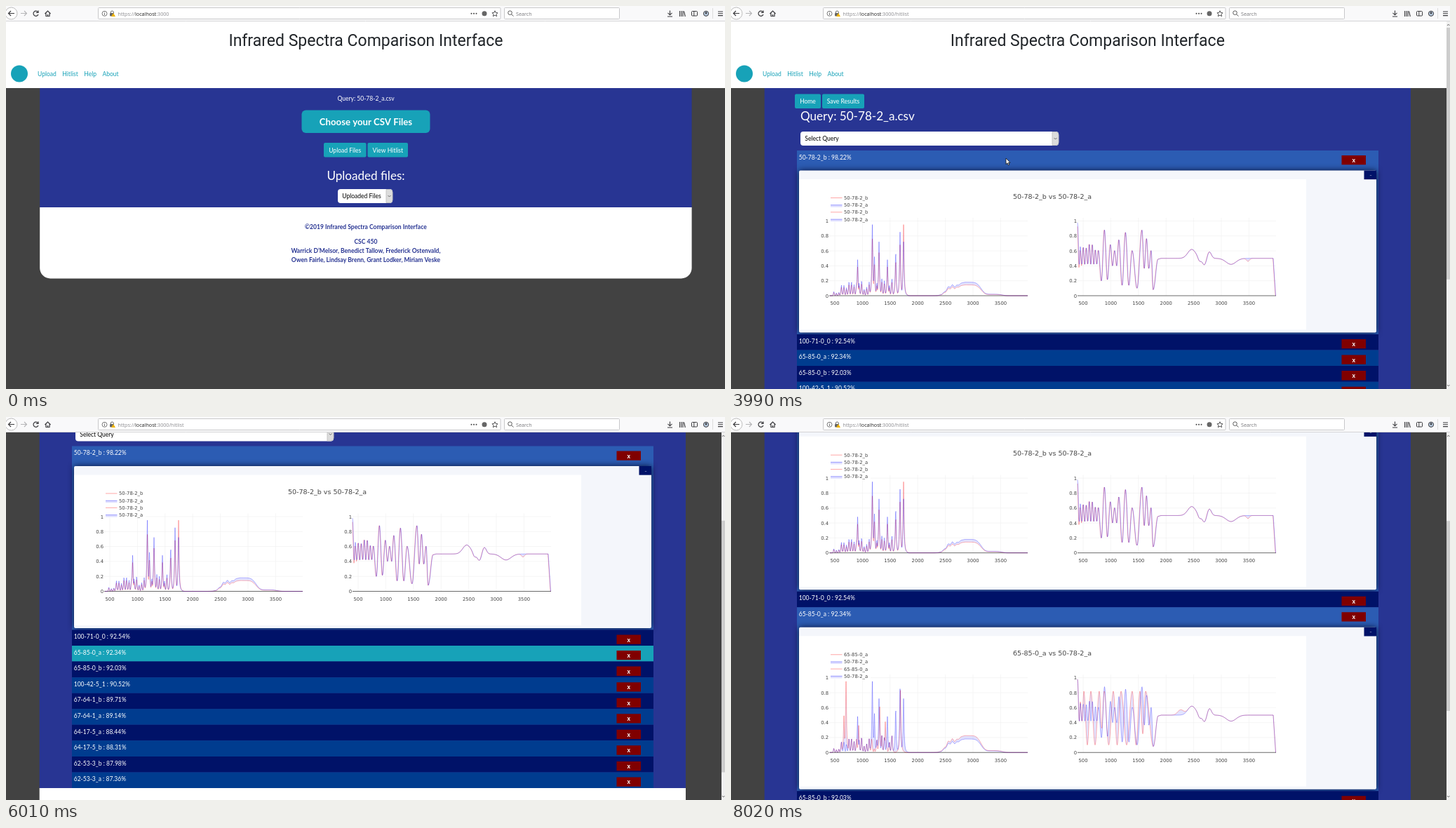
An HTML page with a canvas that plays this animation: 1025x546 px, repeating every 8.56 s.

```html
<!DOCTYPE html>
<html lang="en">
<head>
<meta charset="utf-8">
<title>Infrared Spectra Comparison Interface</title>
<style>
html, body { margin: 0; width: 100%; height: 100%; overflow: hidden; }
canvas { display: block; }
</style>
</head>
<body>
<canvas id="stage" width="1025" height="546"></canvas>
<script>
const ctx = document.getElementById('stage').getContext('2d');
const LOOP = 8560, TEAL = '#17a2b8', INDIGO = '#283593', NAVY = '#001268';
const LIST_TOP = 206, ROW = 22.55, OPEN_ROW = 262;
const CLICK = 1600, HITLIST = 2460, OPEN_FIRST = 3910, OPEN_SECOND = 6170, LEAVE = 8020;
const hits = ['50-78-2_b : 98.22%', '100-71-0_0 : 92.54%', '65-85-0_a : 92.34%', '65-85-0_b : 92.03%',
  '100-42-5_1 : 90.52%', '67-64-1_b : 89.71%', '67-64-1_a : 89.14%', '64-17-5_a : 88.44%',
  '64-17-5_b : 88.31%', '62-53-3_b : 87.98%', '62-53-3_a : 87.36%'];

// Motion: each move is [from, to, ...destination]
const clamp = (v, low, high) => Math.min(high, Math.max(low, v));
const smooth = u => u * u * (3 - 2 * u);
const follow = (start, moves, t) => moves.reduce((at, [from, to, ...goal]) => {
  const u = smooth(clamp((t - from) / (to - from), 0, 1));
  return at.map((v, i) => v + (goal[i] - v) * u);
}, start);
const scrollAt = t => follow([0], [[4565, 5010, 164.5], [6640, 7140, 219.3]], t)[0];
const cursorAt = t => follow([912, 456], [
  [70, 900, 550, 216], [900, 1130, 544, 207], [1680, 2060, 567, 220], [2460, 3300, 392, 217],
  [5360, 5780, 381, 336], [7130, 7400, 406, 318], [7520, 8000, 985, 540]], t);

// Drawing helpers
function box(x, y, w, h, fill, radius = 0, stroke) {
  ctx.beginPath();
  ctx.roundRect(x, y, w, h, radius);
  if (fill) { ctx.fillStyle = fill; ctx.fill(); }
  if (stroke) { ctx.strokeStyle = stroke; ctx.lineWidth = 1; ctx.stroke(); }
}
function line(path, color, width = 1) {
  ctx.strokeStyle = color;
  ctx.lineWidth = width;
  ctx.stroke(typeof path === 'string' ? new Path2D(path) : path);
}
function disc(x, y, r, fill, stroke) { box(x - r, y - r, 2 * r, 2 * r, fill, r, stroke); }
function text(s, x, y, size = 8.54, color = '#fff', align = 'left', font = 'Lato', weight = 400) {
  ctx.font = `${weight} ${size}px "${font}", sans-serif`;
  ctx.fillStyle = color;
  ctx.textAlign = align;
  ctx.fillText(s, x, y);
  return ctx.measureText(s).width;
}
function at(x, y, paint) {
  ctx.save();
  ctx.translate(x, y);
  paint();
  ctx.restore();
}
function button(label, x, y, w, fill = TEAL) {
  box(x, y, w, 20.5, fill, 2);
  text(label, x + w / 2, y + 13.7, 8.54, '#fff', 'center');
}
function select(label, x, y, w) {
  box(x, y, w, 20, '#fff', 4);
  box(x + w - 9, y + .5, 9, 19, '#dcdcdc', [0, 4, 4, 0], '#c4c4c4');
  line(`M${x + w - 6.5} ${y + 9}l2 2l2 -2`, '#555', .8);
  text(label, x + 6.3, y + 13, 8.54, '#000');
}

// Spectra, as functions of the horizontal chart position
let seed = 7;
const random = () => (seed = seed * 16807 % 2147483647) / 2147483647;
const bump = (x, centre, width, power = 2) => Math.exp(-(Math.abs((x - centre) / width) ** power));
const peak = (x, centre, height) => height / (1 + ((x - centre) / .8) ** 2) - .008;

const ripple = Array.from({ length: 25 }, (_, i) =>
  [143 + i * 3.6, Math.min(1, .1 + i / 6) * (.05 + .2 * random())]);
const broadBand = x => bump(x, 314, 10) * (.13 + .015 * Math.sin(x)) + .18 * bump(x, 340, 18, 4) + .02 * bump(x, 372, 16, 4);
const absorbance = (peaks, band) => x =>
  Math.max(0, band * broadBand(x), ...[...ripple, ...peaks].map(([centre, height]) => peak(x, centre, height)));

// Crests joined by cosines; wider gaps give deeper troughs
function oscillation(crests, height) {
  const small = Array.from({ length: 7 }, (_, i) => 498 + i * 4.3).filter(x => x < crests[0] - 4);
  const tops = [...small.map(x => [x, .56 + .14 * random()]), ...crests.map(x => [x, height(x)])];
  const knots = [[494, .98]];
  tops.forEach(([x, y], i) => {
    const before = i ? tops[i - 1][0] : 495, gap = x - before;
    knots.push([before + gap / 2, clamp(.85 - .075 * gap, .1, .42)], [x, y]);
  });
  knots.push([602, .08], [609, .49], [614, .5]);
  return x => {
    const i = knots.findIndex(k => k[0] > x);
    if (i < 1) return baseline(x);
    const [x0, y0] = knots[i - 1], [x1, y1] = knots[i];
    return y0 + (y1 - y0) * (1 - Math.cos(Math.PI * (x - x0) / (x1 - x0))) / 2;
  };
}
const baseline = x => x > 773 ? .5 * (776.5 - x) / 3.5
  : .5 + .12 * bump(x, 657, 8) + .09 * bump(x, 682, 4) - .09 * bump(x, 675, 4) - .05 * bump(x, 668, 3) - .08 * bump(x, 713, 10);

const query = absorbance([[180.5, .49], [201.5, .96], [204.5, .53], [211, .73], [223, .49], [234.8, .6], [241, .86], [246, .73]], 1);
const twin = x => Math.max(.8 * query(x), peak(x, 246, .96));
const other = absorbance([[161, .5], [164, .96], [182, .37], [212, .62], [220, .42], [241.5, .84]], 1.25);
const queryWave = oscillation([532.5, 541, 547, 553, 562.5, 572, 586, 592.5, 599],
  x => .74 + .14 * Math.cos((x - 532.5) / 27 * 2 * Math.PI));
const twinWave = x => queryWave(x + .4) - .04 * bump(x, 737, 3) - .05 * bump(x, 497, 3);
const otherWave0 = oscillation([503, 513, 525, 532, 545, 556, 572, 583, 591], () => .82);
const otherWave = x => otherWave0(x) + .07 * bump(x, 641, 6);

function plot(red, blue, from, to) {
  const sample = f => Array.from({ length: 2 * (to - from) + 1 }, (_, i) =>
    `${from + i / 2} ${(413 - 106.5 * Math.max(0, f(from + i / 2))).toFixed(2)}`);
  const r = sample(red), b = sample(blue), path = p => 'M' + p.join('L');
  return { red: new Path2D(path(r)), blue: new Path2D(path(b)), area: new Path2D(path([...r, ...b.reverse()]) + 'Z') };
}
const comparison = (name, spectrum, waveform) => ({
  name, plots: [plot(spectrum, query, 141, 423), plot(waveform, queryWave, 494, 776.5)]
});
const charts = { 0: comparison('50-78-2_b', twin, twinWave), 2: comparison('65-85-0_a', other, otherWave) };

function drawChart({ name, plots }) {
  const label = (s, x, y, align) => text(s, x, y, 6.8, '#444', align, 'DejaVu Sans');
  text(`${name} vs 50-78-2_a`, 458, 274.5, 9.5, '#444', 'center', 'DejaVu Sans');
  plots.forEach((p, i) => {
    const left = 140 + i * 354;
    for (let k = 0; k < 7; k++) {
      const x = left + 8 + k * 39.4;
      line(`M${x} 302V413`, '#eee', .6);
      label(500 + k * 500, x, 426.3, 'center');
    }
    for (let k = 0; k < 6; k++) {
      const y = 413 - k * 21.3;
      line(`M${left} ${y}H${left + 283}`, k ? '#eee' : '#444', k ? .6 : .8);
      label(k / 5, left - 1, y + 2.5, 'right');
    }
    ctx.fillStyle = 'rgba(0,0,255,.11)';
    ctx.fill(p.area);
    line(p.red, 'rgba(255,0,0,.5)', .6);
    line(p.blue, 'rgba(0,0,255,.5)', .6);
  });
  box(141, 268, 58, 40, '#fff');
  for (let k = 0; k < 4; k++) {
    const y = 273.5 + k * 10.2, blue = k % 2;
    if (blue) box(142, y, 16.5, 3, 'rgba(0,0,255,.13)');
    line(`M142 ${y}h16.5`, blue ? 'rgba(0,0,255,.5)' : 'rgba(255,0,0,.5)', .7);
    label(blue ? '50-78-2_a' : name, 161, y + 2.4);
  }
}

function drawTooltip() {
  const tag = (y, color, value, name) => {
    box(397, y, 44, 11.4, color);
    ctx.fill(new Path2D(`M394 413L397.5 ${y + 3}V${y + 8}Z`));
    text(value, 399, y + 8.2, 6.9, '#fff', 'left', 'Liberation Sans');
    text(name, 443, y + 8.2, 6.9, color, 'left', 'Liberation Sans');
  };
  tag(400.5, '#f00', '0.008571429', '50-78-2_b');
  tag(413, '#00f', '0.005714286', '50-78-2_a');
  box(382, 423.5, 20.5, 11, '#444');
  ctx.fill(new Path2D('M389 424l3 -4l3 4Z'));
  text('3600', 392.2, 431.5, 6.9, '#fff', 'center', 'Liberation Sans');
}

function drawFooter(top, left, width) {
  box(left, top, width, 101.5, '#fff', [0, 0, 15, 15]);
  ['©2019 Infrared Spectra Comparison Interface', 'CSC 450',
    'Warrick D’Melsor, Benedict Tallow, Frederick Ostenvald,',
    'Owen Fairle, Lindsay Brenn, Grant Lodker, Miriam Veske'
  ].forEach((s, i) => text(s, left + width / 2, top + (i ? 39 + 13 * i : 30.5), 8.54, INDIGO, 'center', 'Lato', 700));
}

function drawUpload(t, left, width) {
  box(left, 117, width, 170, INDIGO);
  text('Query: 50-78-2_a.csv', 513, 135.3, 8.54, '#fff', 'center');
  box(421.5, 148.5, 183, 32.5, TEAL, 6);
  text('Choose your CSV Files', 513, 169.8, 13.2, '#fff', 'center', 'Lato', 700);
  button('Upload Files', 453, 195, 60.5);
  if (t >= CLICK) box(513.8, 193.3, 61, 24, 'rgba(23,162,184,.5)', 3);
  button('View Hitlist', 515.5, 195, 57.5, t >= 970 ? '#138496' : TEAL);
  text('Uploaded files:', 513, 248, 17.1, '#fff', 'center');
  select('Uploaded Files', 473, 261, 78);
  drawFooter(287, left, width);
}

function drawPanel(x, w, chart) {
  ctx.save();
  ctx.shadowColor = 'rgba(0,0,30,.85)';
  ctx.shadowBlur = 9;
  box(x, 0, w, 231, '#f4f6fb', 2);
  ctx.restore();
  box(x, 12.5, 723, 214.5, '#fff');
  box(x + w - 17.5, 0, 17.5, 12.7, NAVY);
  text('–', x + w - 8, 8.5, 6, '#fff', 'center');
  if (chart) at(0, -234.5, () => drawChart(chart));
}

function drawHitlist(t, left, width, pointerY) {
  const shift = t >= OPEN_FIRST ? -1 : 0, x = 95 + shift, w = shift ? 829 : 836.5;
  const isOpen = i => (i === 0 && t >= OPEN_FIRST) || (i === 2 && t >= OPEN_SECOND);
  const heights = hits.map((_, i) => isOpen(i) ? OPEN_ROW : ROW);
  const bottom = heights.reduce((sum, h) => sum + h, LIST_TOP);
  box(left, 117, width, bottom - 117, INDIGO);
  button('Home', 92 + shift, 125.5, 37);
  button('Save Results', 131 + shift, 125.5, 60);
  text('Query: 50-78-2_a.csv', 100 + shift, 163, 17.1);
  select('Select Query', 100 + shift, 179, shift ? 368 : 371.5);
  let y = LIST_TOP;
  hits.forEach((hit, i) => {
    const h = heights[i], hover = t < LEAVE && pointerY >= y && pointerY < y + h;
    box(x, y, w, h, isOpen(i) ? '#2c5cb3' : hover ? TEAL : i % 2 ? NAVY : '#003c8f');
    if (isOpen(i)) at(0, y + 28.5, () => drawPanel(x + 3, w - 6, t >= 3990 && charts[i]));
    text(hit, x + 2.7, y + 12.7);
    box(x + w - 52.5, y + 7, 34.5, 13.3, '#800000');
    text('x', x + w - 35.2, y + 17, 8.54, '#fff', 'center', 'Lato', 700);
    y += h;
  });
  drawFooter(bottom, left, width);
}

function drawBrowser(t) {
  const dark = '#3b3b3e', url = (s, x, color) => x + text(s, x, 14, 7.2, color, 'left', 'Open Sans');
  box(0, 0, 1025, 22, '#f9f9fa');
  line('M0 21.5H1025', '#d4d4d6');
  disc(7.5, 10.5, 8.5, '#fff', '#bbb');
  line('M12 10.5H3.5M7 7L3.5 10.5L7 14', dark, 1.2);
  line('M21 10.5H29.5M26 7L29.5 10.5L26 14', '#b5b5b7', 1.1);
  line('M45.5 8.5A3.6 3.6 0 1 0 46 12M46 6.5V9.3H43', dark, 1.2);
  line('M55.5 11L59.5 7L63.5 11M57 10.5V14.5H62V10.5M59.5 14.5V12', dark, 1.2);
  box(131.5, 2.5, 573.5, 16, '#fff', 1, '#c8c8ca');
  box(710.5, 2.5, 164, 16, '#fff', 1, '#c8c8ca');
  disc(140.5, 10.8, 3.5, null, '#777');
  line('M140.5 10V13M140.5 8.3V9.2', '#777');
  line('M149.3 10V9A2 2 0 0 1 153.3 9V10', '#666');
  box(148, 10, 6, 4.5, '#666', 1);
  ctx.fillStyle = '#f0b400';
  ctx.fill(new Path2D('M153 10L156 15H150Z'));
  let x = url('https://', 159.5, '#8a8a8e');
  x = url('localhost', x, '#222');
  url(t >= CLICK ? ':3000/hitlist' : ':3000', x, '#8a8a8e');
  for (let i = -1; i < 2; i++) disc(667 + i * 3.5, 10.8, 1, '#444');
  disc(682, 10.8, 3.5, '#666');
  line('M697 6.8L698.2 9.5L701 9.8L699 11.8L699.6 14.6L697 13.2L694.4 14.6L695 11.8L693 9.8L695.8 9.5Z', dark, .9);
  disc(718.5, 9.7, 2.8, null, '#555');
  line('M720.8 12L723.4 14.6', '#555');
  url('Search', 727, '#77777b');
  line('M946.5 6.5V12.5M943.5 9.8L946.5 12.8L949.5 9.8M943 15H950', dark, 1.1);
  line('M960.5 7V15M962.8 7V15M965 7V15M966.5 7.5L968.3 15', dark, 1.1);
  box(977.5, 7.5, 8, 6.5, null, 1, dark);
  line('M980.8 7.5V14', dark);
  disc(998, 10.8, 3.6, '#b9cbe0', dark);
  disc(998, 10, 1.4, dark);
  line('M1007.5 3V18', '#ddd');
  line('M1015 8H1022M1015 10.8H1022M1015 13.6H1022', dark, 1.1);
}

function drawScrollbar(t, scroll) {
  const ratio = t >= OPEN_SECOND ? .535 : .709;
  box(1020, 22, 5, 524, '#f0f0f0');
  box(1020, 31 + scroll * ratio, 5, 506 * ratio, '#cdcdcd');
  line('M1021 28l1.7 -2l1.7 2M1021 540l1.7 2l1.7 -2', '#555', .8);
}

function drawCursor(t) {
  if (t >= 4860 && t < 6010) {
    line('M-6.5 -.5H6.5M0 -7V6.5', '#fff', 2);
    line('M-6.5 -.5H6.5M0 -7V6.5', '#111', 1.2);
    return;
  }
  const shape = new Path2D(t >= 1000 && t < 1430
    ? 'M-1 0Q0 -1 1 0V4L4.5 5Q6 5.5 5.5 7.5L4.5 11H-1L-4 7Q-3.5 5.5 -1 7Z'
    : 'M0 0V8.6L2 6.8L3.4 10L4.8 9.3L3.4 6.3H6Z');
  ctx.fillStyle = '#fff';
  ctx.fill(shape);
  line(shape, '#111', .8);
}

function draw(t) {
  const scroll = scrollAt(t), [x, y] = cursorAt(t), scrolling = t >= OPEN_FIRST;
  const left = scrolling ? 47.7 : 48.2, width = scrolling ? 921.3 : 929.4;
  box(0, 0, 1025, 546, '#424242');
  at(0, -scroll, () => {
    box(0, 22, 1025, 95, '#fff');
    text('Infrared Spectra Comparison Interface', left + width / 2, 56.5, 23, '#212529', 'center', 'Roboto');
    disc(19, 96.5, 12, TEAL);
    let navX = 45;
    for (const item of ['Upload', 'Hitlist', 'Help', 'About']) navX += 8.54 + text(item, navX, 100, 8.54, TEAL);
    if (t < HITLIST) drawUpload(t, left, width);
    else drawHitlist(t, left, width, y + scroll);
    if (t >= 4930 && t < 5600 && y < 249) drawTooltip();
  });
  if (scrolling) drawScrollbar(t, scroll);
  drawBrowser(t);
  if (t >= 70 && t < LEAVE && !(t >= 6010 && t < 6390)) at(x, y, () => drawCursor(t));
}

const start = performance.now();
function frame() {
  draw((performance.now() - start) % LOOP);
  requestAnimationFrame(frame);
}
frame();
</script>
</body>
</html>
```
